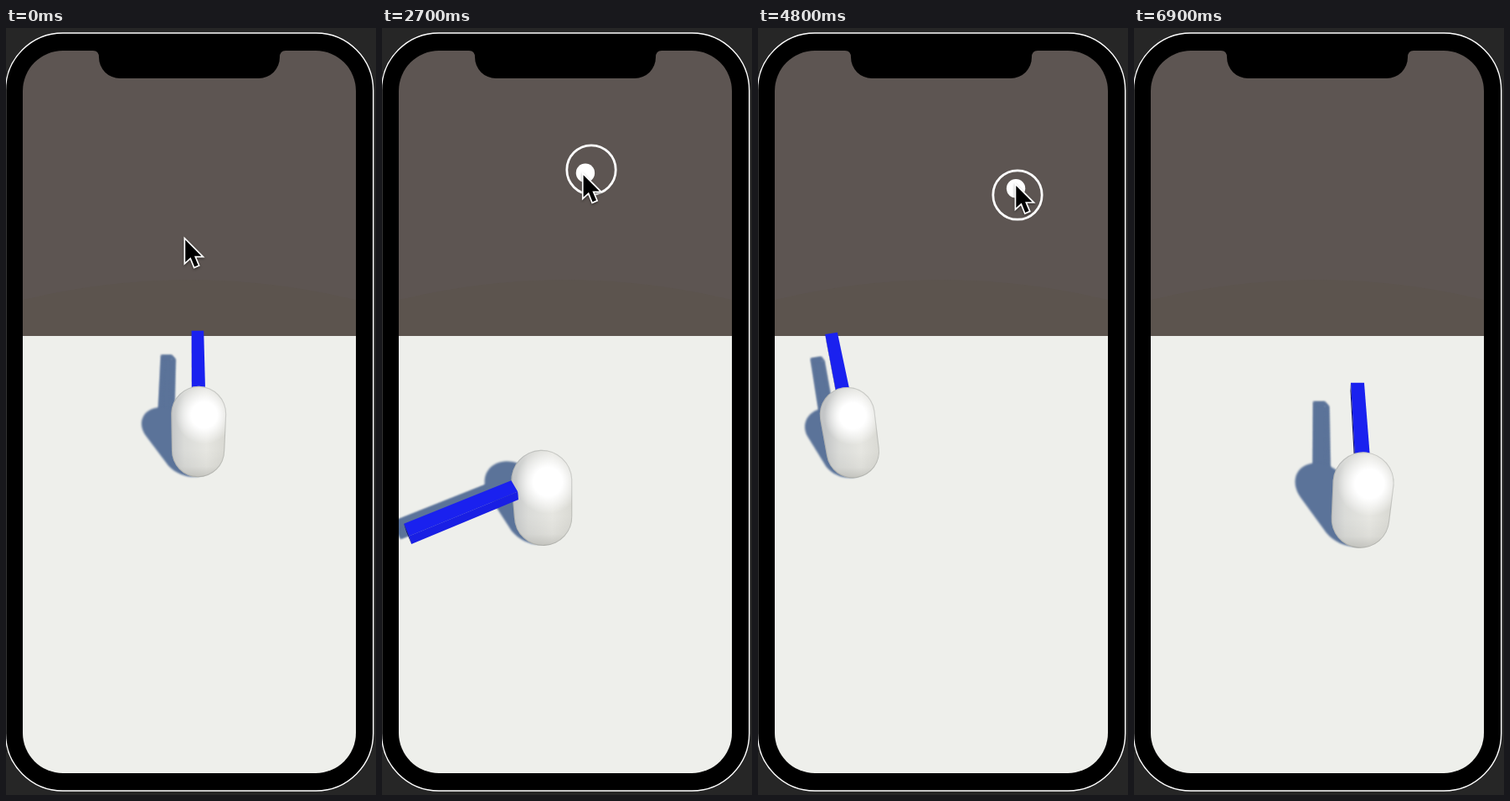
An HTML page with a canvas that plays this animation: 442 by 914 pixels, repeating every 7.4 s.

```html
<!DOCTYPE html>
<html lang="en">
<head>
<meta charset="utf-8">
<title>Joystick character</title>
<style>
html, body { margin: 0; width: 100%; height: 100%; overflow: hidden; background: #262626; }
canvas { display: block; }
</style>
</head>
<body>
<canvas id="stage" width="442" height="914"></canvas>
<script>
const ctx = document.getElementById('stage').getContext('2d');
const LOOP = 7400, STEP = 100, TAU = Math.PI * 2, RAD = Math.PI / 180;

// Camera at the origin, pitched 45 degrees down
const FOCAL = 746, CX = 219, CY = 457.5, S = Math.SQRT1_2;
const BODY_Y = -8.52, GROUND_Y = -9.52, RADIUS = 0.5;
const ARM = { length: 2.26, half: 0.125, low: 0.43, high: 0.64 };
const LIGHT = { x: -0.435, z: 0.727 };          // drift per unit of fall
const TO_LIGHT = [0.321, 0.766, -0.557];
const HOME = { x: .17, z: 7.97 };
const KNOB_REACH = 8, POINTER_REACH = 12;

// Each press of the joystick, with its turns: from, to, heading a to b, units per second
const turn = (from, to, a, b, speed) => ({ from, to, a: a * RAD, b: b * RAD, speed });
const DRAGS = [
  { from: 400, to: 1200, x: 109, y: 200, turns: [turn(700, 1200, 0, 75, 0)] },
  { from: 1600, to: 3600, x: 250, y: 169, turns: [
    turn(2000, 2200, 70, 180, 0), turn(2200, 2380, 180, 180, 3.4),
    turn(2380, 3100, 180, 320, 3.54), turn(3100, 3600, 320, 438, 3.2)] },
  { from: 4200, to: 6100, x: 310, y: 199, turns: [
    turn(4500, 4800, 194, 346, 2.1), turn(4800, 5100, 346, 450, 3.68),
    turn(5100, 5800, 450, 531, 3.68), turn(5800, 6100, 531, 540, 2.6)] }
];
const TURNS = DRAGS.flatMap(d => d.turns);
const STOPS = [
  [0, 213, 250],
  ...DRAGS.flatMap(d => [[d.from, d.x, d.y], [d.to, d.x, d.y]]),
  [6500, 301, 196], [6600, 301, 196], [6800, 58, 684]
];
const POINTER_END = 6900;

// The character walks where the knob points and faces ahead once released
function characterAt(t) {
  let { x, z } = HOME;
  for (const { from, to, a, b, speed } of TURNS) {
    if (t <= from) break;
    const time = (Math.min(t, to) - from) / 1000, rate = (b - a) / (to - from) * 1000;
    const q = a + rate * time;
    x += speed * (rate ? (Math.cos(a) - Math.cos(q)) / rate : Math.sin(a) * time);
    z += speed * (rate ? (Math.sin(q) - Math.sin(a)) / rate : Math.cos(a) * time);
  }
  const now = TURNS.find(k => t >= k.from && t < k.to);
  const heading = now ? now.a + (now.b - now.a) * (t - now.from) / (now.to - now.from) : 0;
  return { x, z, heading, pushed: !!now };
}

function pointerAt(t) {
  const i = STOPS.findIndex(s => s[0] > t);
  if (i < 0) return STOPS[STOPS.length - 1].slice(1);
  const [t0, x0, y0] = STOPS[i - 1], [t1, x1, y1] = STOPS[i];
  const p = (t - t0) / (t1 - t0), ease = p * p * (3 - 2 * p);
  return [x0 + (x1 - x0) * ease, y0 + (y1 - y0) * ease];
}

function project(x, y, z) {
  const depth = (z - y) * S;
  return [CX + FOCAL * x / depth, CY - FOCAL * (y + z) * S / depth, FOCAL / depth];
}

function poly(points) {
  ctx.beginPath();
  points.forEach(p => ctx.lineTo(p[0], p[1]));
  ctx.closePath();
}

function rounded(x, y, w, h, r) {
  ctx.beginPath();
  ctx.roundRect(x, y, w, h, r);
}

function gradient(g, ...stops) {
  stops.forEach(([at, color]) => g.addColorStop(at, color));
  return g;
}

function drawWorld() {
  ctx.fillStyle = '#5d5552';
  ctx.fillRect(20, 27, 398, 340);
  ctx.fillStyle = '#5c544e';
  ctx.beginPath();
  ctx.moveTo(20, 324);
  ctx.quadraticCurveTo(219, 276, 418, 324);
  ctx.lineTo(418, 367);
  ctx.lineTo(20, 367);
  ctx.fill();
  ctx.fillStyle = '#eeefeb';
  ctx.fillRect(20, 367, 398, 521);
}

// The arm as six faces, each with corners and an outward normal
function armFaces(x, z, a, from) {
  const dx = Math.sin(a), dz = Math.cos(a), { length: L, half: e, low, high } = ARM;
  const at = (r, side, h) => [x + dx * r + dz * side, BODY_Y + h, z + dz * r - dx * side];
  const side = s => [at(from, s, low), at(L, s, low), at(L, s, high), at(from, s, high)];
  const flat = h => [at(from, -e, h), at(L, -e, h), at(L, e, h), at(from, e, h)];
  const end = r => [at(r, -e, low), at(r, e, low), at(r, e, high), at(r, -e, high)];
  return [
    { pts: flat(high), n: [0, 1, 0] }, { pts: flat(low), n: [0, -1, 0] },
    { pts: side(e), n: [dz, 0, -dx] }, { pts: side(-e), n: [-dz, 0, dx] },
    { pts: end(L), n: [dx, 0, dz] }, { pts: end(from), n: [-dx, 0, -dz] }
  ];
}

const dot = (a, b) => a[0] * b[0] + a[1] * b[1] + a[2] * b[2];

function drawArm(x, z, a, from) {
  for (const { pts, n } of armFaces(x, z, a, from)) {
    if (dot(n, pts[0]) >= 0) continue;
    const lit = Math.sqrt(Math.min(1, Math.max(0, dot(n, TO_LIGHT) / .766)));
    const mix = (dark, light) => Math.round(dark + (light - dark) * lit);
    ctx.fillStyle = `rgb(${mix(10, 26)},${mix(12, 33)},${mix(110, 239)})`;
    poly(pts.map(p => project(...p)));
    ctx.fill();
  }
}

function dropToGround(x, y, z) {
  const fall = y - GROUND_Y;
  return project(x + LIGHT.x * fall, GROUND_Y, z + LIGHT.z * fall);
}

function drawShadow(x, z, a) {
  ctx.save();
  ctx.filter = 'blur(1.2px)';
  ctx.fillStyle = '#5b7399';
  for (const { pts } of armFaces(x, z, a, 0)) {
    poly(pts.map(p => dropToGround(...p)));
    ctx.fill();
  }
  // Hull of the two end spheres, each an ellipse stretched along the light
  const len = Math.hypot(LIGHT.x, LIGHT.z), ux = LIGHT.x / len, uz = LIGHT.z / len;
  poly(Array.from({ length: 49 }, (_, i) => {
    const q = -Math.PI / 2 + i / 48 * TAU;
    const along = Math.cos(q) * .64 + (i <= 24 ? 1.5 : .5) * len;
    const across = Math.sin(q) * .485;
    return project(x + ux * along - uz * across, GROUND_Y, z + uz * along + ux * across);
  }));
  ctx.fill();
  ctx.restore();
}

function capsulePath(top, low, r1, r2) {
  const tilt = Math.atan2(low[1] - top[1], low[0] - top[0]) - Math.PI / 2;
  ctx.beginPath();
  ctx.arc(top[0], top[1], r1, Math.PI + tilt, TAU + tilt);
  ctx.arc(low[0], low[1], r2, tilt, Math.PI + tilt);
  ctx.closePath();
}

// Arm shadow falling on the near side of the cylinder
function drawBodyShade(x, z, a) {
  const nx = Math.cos(a), nz = -Math.sin(a);
  let slope = LIGHT.x * nx + LIGHT.z * nz;
  if (Math.abs(slope) < .12) slope = slope < 0 ? -.12 : .12;
  const edge = e => Array.from({ length: 25 }, (_, i) => {
    const u = -.5 + i / 24, w = -Math.sqrt(.25 - u * u);
    const fall = Math.min(1.6, Math.max(0, (u * nx + w * nz - e) / slope));
    return project(x + u, BODY_Y + .55 - fall, z + w);
  });
  ctx.save();
  ctx.filter = 'blur(1px)';
  ctx.fillStyle = 'rgba(92,110,138,.85)';
  poly([...edge(ARM.half), ...edge(-ARM.half).reverse()]);
  ctx.fill();
  ctx.restore();
}

function drawCapsule(x, z, a) {
  const top = project(x, BODY_Y + .5, z), low = project(x, BODY_Y - .5, z);
  const r1 = top[2] * RADIUS, r2 = low[2] * RADIUS + .6;
  const box = [Math.min(top[0], low[0]) - 60, top[1] - 60, 130, 190];
  ctx.save();
  capsulePath(top, low, r1, r2);
  ctx.clip();
  ctx.fillStyle = gradient(ctx.createLinearGradient(low[0] - r1, 0, low[0] + r1, 0),
    [0, '#c3c5c6'], [.25, '#dadbd8'], [.65, '#e6e6e1'], [1, '#d8d8d2']);
  ctx.fillRect(...box);
  ctx.fillStyle = gradient(ctx.createLinearGradient(0, low[1], 0, low[1] + r2),
    [0, 'rgba(150,150,144,0)'], [.6, 'rgba(150,150,144,.1)'], [1, 'rgba(150,150,144,.42)']);
  ctx.fillRect(...box);
  const hx = top[0] + r1 * .2, hy = top[1] + r1 * .04;
  ctx.fillStyle = gradient(ctx.createRadialGradient(hx, hy, 0, hx, hy, r1 * 1.05),
    [0, '#fff'], [.45, '#fff'], [1, 'rgba(255,255,255,0)']);
  ctx.fillRect(...box);
  if (Math.cos(a) < -.3) drawBodyShade(x, z, a);
  capsulePath(top, low, r1, r2);
  ctx.strokeStyle = 'rgba(120,122,120,.28)';
  ctx.lineWidth = 2.2;
  ctx.stroke();
  ctx.restore();
}

function drawCharacter({ x, z, heading }) {
  const near = Math.cos(heading) < .35;
  drawShadow(x, z, heading);
  if (!near) drawArm(x, z, heading, .3);
  drawCapsule(x, z, heading);
  if (near) drawArm(x, z, heading, .48);
}

function drawJoystick({ x, y }, kx, ky) {
  ctx.strokeStyle = ctx.fillStyle = '#fff';
  ctx.lineWidth = 2.8;
  ctx.beginPath();
  ctx.arc(x, y, 29.2, 0, TAU);
  ctx.stroke();
  ctx.beginPath();
  ctx.arc(x + kx * KNOB_REACH, y + ky * KNOB_REACH, 11.2, 0, TAU);
  ctx.fill();
}

function drawPointer(x, y) {
  ctx.save();
  ctx.translate(x, y);
  poly([[1.2, 2.6], [1.2, 29], [7.6, 23.2], [12.2, 34.6], [16.6, 32.7], [12, 21.8], [20.4, 21.8]]);
  ctx.lineWidth = 3.4;
  ctx.strokeStyle = '#fff';
  ctx.shadowColor = 'rgba(0,0,0,.4)';
  ctx.shadowBlur = 3;
  ctx.shadowOffsetY = 1.5;
  ctx.stroke();
  ctx.shadowColor = 'transparent';
  ctx.fillStyle = '#000';
  ctx.fill();
  ctx.restore();
}

function drawNotch() {
  ctx.fillStyle = '#000';
  ctx.beginPath();
  ctx.moveTo(104, 26);
  ctx.lineTo(104, 27);
  ctx.quadraticCurveTo(111, 27, 111, 35);
  ctx.arcTo(111, 60, 136, 60, 25);
  ctx.arcTo(327, 60, 327, 35, 25);
  ctx.quadraticCurveTo(327, 27, 334, 27);
  ctx.lineTo(334, 26);
  ctx.fill();
}

function draw(t) {
  ctx.fillStyle = '#262626';
  ctx.fillRect(0, 0, 442, 914);
  rounded(-.5, 6, 439.2, 903, 68.5);
  ctx.fillStyle = '#000';
  ctx.fill();
  ctx.strokeStyle = '#fff';
  ctx.lineWidth = 1.4;
  ctx.stroke();

  const hero = characterAt(t), drag = DRAGS.find(d => t >= d.from && t < d.to);
  const kx = hero.pushed ? Math.sin(hero.heading) : 0;
  const ky = hero.pushed ? -Math.cos(hero.heading) : 0;
  const [px, py] = pointerAt(t);
  ctx.save();
  rounded(20, 27, 398, 861, 48);
  ctx.clip();
  drawWorld();
  drawCharacter(hero);
  if (drag) drawJoystick(drag, kx, ky);
  if (t < POINTER_END) drawPointer(px + kx * POINTER_REACH, py + ky * POINTER_REACH - (hero.pushed ? 2 : 0));
  ctx.restore();
  drawNotch();
}

const start = performance.now();
function tick() {
  const t = (performance.now() - start) % LOOP;
  draw(Math.floor(t / STEP) * STEP);
  requestAnimationFrame(tick);
}
tick();
</script>
</body>
</html>
```
